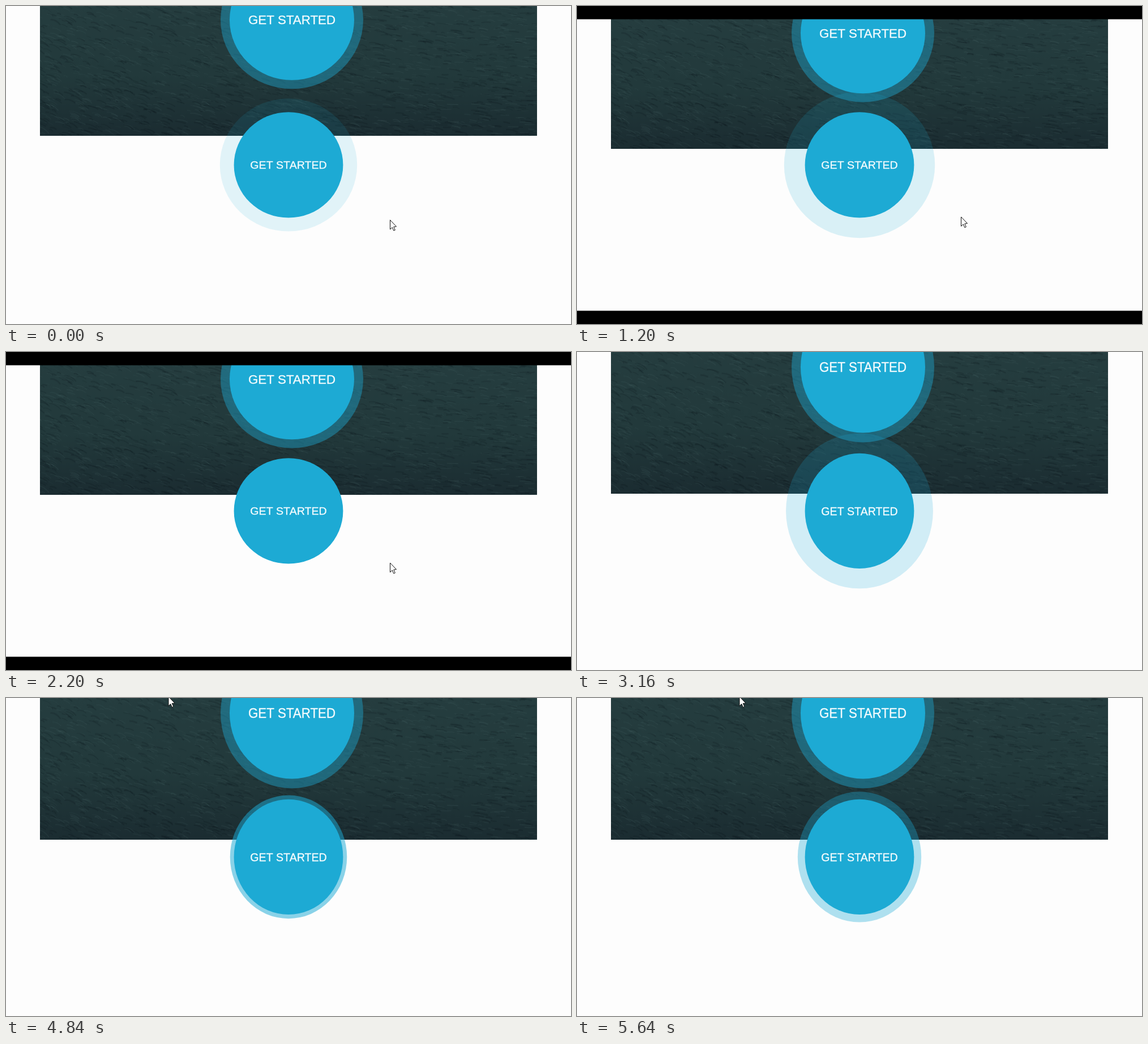
These frames come from a looping animation (998 px wide and 561 px high, 5720 ms). An HTML page with a canvas:

```html
<!DOCTYPE html>
<html lang="en">
<head>
<meta charset="utf-8">
<title>Pulsing button</title>
<style>
  html, body { margin: 0; width: 100%; height: 100%; overflow: hidden; background: #fdfdfd; }
  canvas { display: block; width: 998px; height: 561px; }
</style>
</head>
<body>
<canvas id="stage" width="998" height="561"></canvas>
<script>
const W = 998, H = 561, LOOP = 5720, STEP = 40;
const ctx = document.getElementById('stage').getContext('2d');
const blue = alpha => `rgba(29, 170, 212, ${alpha})`;

// Page layouts: vertical stretch, centre of the upper button, height of the black bars
const LAYOUTS = [
  { from: 0, stretch: 0.967, top: 24.4, bar: 0 },
  { from: 40, stretch: 0.967, top: 47.8, bar: 23.4 },
  { from: 2840, stretch: 1.054, top: 26.6, bar: 0 }
];
const CURSORS = [
  { from: 0, x: 678.5, y: 377.5 },
  { from: 40, x: 678.5, y: 372 },
  { from: 2840 },
  { from: 4720, x: 287, y: -2.5 }
];
const PHOTO = { x: 60, width: 878, above: 60, below: 211.6 };

const current = (list, t) => list.filter(item => item.from <= t).pop();

function seeded(seed) {
  return () => {
    seed = (seed * 1664525 + 1013904223) % 4294967296;
    return seed / 4294967296;
  };
}

function makeSea() {
  const sea = document.createElement('canvas');
  sea.width = PHOTO.width;
  sea.height = Math.round(PHOTO.above + PHOTO.below);
  const g = sea.getContext('2d');
  const rand = seeded(17);
  const shade = g.createLinearGradient(0, 0, 0, sea.height);
  shade.addColorStop(0, '#263e40');
  shade.addColorStop(0.6, '#22393b');
  shade.addColorStop(1, '#1b2c31');
  g.fillStyle = shade;
  g.fillRect(0, 0, sea.width, sea.height);
  g.lineCap = 'round';
  for (let i = 0; i < 2600; i++) {
    const x = rand() * (sea.width + 20) - 20, y = rand() * sea.height;
    const length = 5 + rand() * 16;
    const slope = 0.42 - 0.34 * x / sea.width + (rand() - 0.5) * 0.3;
    const light = rand() < 0.5;
    g.strokeStyle = light ? 'rgba(92, 122, 122, 0.13)' : 'rgba(6, 14, 18, 0.16)';
    g.lineWidth = 0.7 + rand() * (light ? 1 : 1.8);
    g.beginPath();
    g.moveTo(x, y);
    g.quadraticCurveTo(x + length / 2, y - 2 + rand() * 3, x + length, y + length * slope);
    g.stroke();
  }
  return sea;
}

const sea = makeSea();

function drawPhoto({ top, stretch }) {
  const y = top - PHOTO.above * stretch;
  const bottom = Math.round(top + PHOTO.below * stretch);
  ctx.drawImage(sea, PHOTO.x, y, PHOTO.width, bottom - y);
}

function disc(radius, color) {
  ctx.fillStyle = color;
  ctx.beginPath();
  ctx.arc(0, 0, radius, 0, Math.PI * 2);
  ctx.fill();
}

function drawButton(x, y, stretch, radius, fontSize, rings) {
  ctx.save();
  ctx.translate(x, y);
  ctx.scale(1, stretch);
  rings.forEach(ring => disc(radius + ring.spread, blue(ring.alpha)));
  disc(radius, blue(1));
  ctx.fillStyle = ctx.strokeStyle = '#f4fbfd';
  ctx.lineWidth = 0.35;
  ctx.font = `${fontSize}px "Liberation Sans", Arial, sans-serif`;
  ctx.textAlign = 'center';
  ctx.fillText('GET STARTED', 0, fontSize * 0.36);
  ctx.strokeText('GET STARTED', 0, fontSize * 0.36);
  ctx.restore();
}

// Each cycle sends out a wide quick ring, then a narrower slow one
function pulseRings(t) {
  const held = t >= 2200 && t < 2840 ? 2200 : t;
  const phase = (held - 758 + 2000) % 2000;
  const rings = [];
  const add = (progress, reach) => {
    const alpha = 0.6 * (1 - progress);
    if (alpha > 0.03) rings.push({ spread: reach * progress, alpha });
  };
  if (phase < 600) add(phase / 600, 50);
  const u = (phase - 560) / 960;
  if (u > 0 && u < 1) add(1 - Math.pow(1 - u, 1.3), 31);
  return rings;
}

function drawCursor({ x, y }) {
  if (x === undefined) return;
  const outline = [[0, 0], [0, 16.5], [3.8, 13], [6.4, 18.8], [8.8, 17.7], [6.3, 12], [11, 11.6]];
  ctx.beginPath();
  outline.forEach(([dx, dy]) => ctx.lineTo(x + dx, y + dy));
  ctx.closePath();
  ctx.fillStyle = '#fff';
  ctx.fill();
  ctx.strokeStyle = '#111';
  ctx.lineWidth = 1;
  ctx.stroke();
}

function draw(t) {
  const layout = current(LAYOUTS, t);
  ctx.fillStyle = '#fdfdfd';
  ctx.fillRect(0, 0, W, H);
  drawPhoto(layout);
  drawButton(505, layout.top, layout.stretch, 110, 22.3, [{ spread: 16, alpha: 0.42 }]);
  drawButton(499, 280.4, layout.stretch, 96.4, 19.6, pulseRings(t));
  ctx.fillStyle = '#000';
  ctx.fillRect(0, 0, W, layout.bar);
  ctx.fillRect(0, H - layout.bar, W, layout.bar);
  drawCursor(current(CURSORS, t));
}

const start = performance.now();

function tick() {
  const elapsed = Math.max(0, performance.now() - start) % LOOP;
  draw(Math.floor(elapsed / STEP) * STEP);
  requestAnimationFrame(tick);
}
tick();
</script>
</body>
</html>
```
